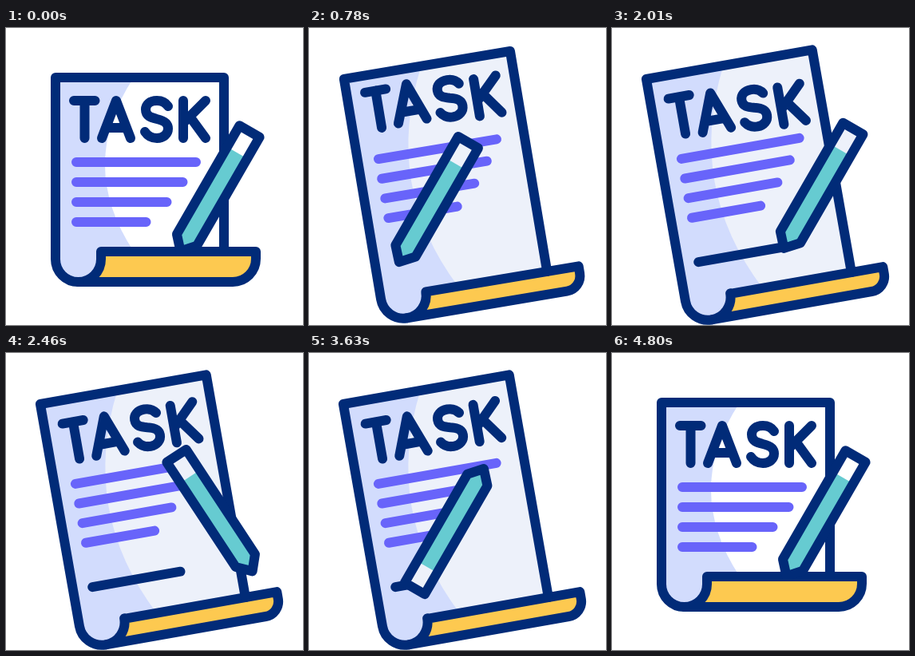
Animation, 372 px wide and 372 px high, one loop 5.13 s. Source, as an HTML page:

```html
<!DOCTYPE html>
<html lang="en">
<head>
<meta charset="utf-8">
<title>Task</title>
<style>
  html, body { margin: 0; width: 100%; height: 100%; overflow: hidden; background: #fff; }
  svg { display: block; width: 100vw; height: 100vh; }
  .ink { stroke: #012b78; stroke-width: 12; }
</style>
</head>
<body>
<svg viewBox="0 0 372 372" fill="none" stroke-linecap="round" stroke-linejoin="round">
  <g id="page">
    <path id="sheet"/>
    <path id="shade" fill="#d2dcfd"/>
    <path id="roll" class="ink" fill="#fdc950"/>
    <path id="outline" class="ink"/>
    <path stroke="#6864fa" stroke-width="12" d="M88 168H238M88 193H221.500M88 218H201.500M88 243H175.500"/>
    <path id="written" class="ink"/>
    <g id="word" class="ink" role="img" aria-label="TASK">
      <path d="M85 91H111.500M98.500 91V138"/>
      <path d="M120 138L138 91L156 138M127 125H149"/>
      <path d="M203 98C199 92 194 91 189 91C180 91 175 96 175 102C175 110 181 112 189 114C198 116 203 119 203 126C203 133 197 138 189 138C183 138 178 136 174 130"/>
      <path d="M222 91V138M250 91L222 119M231 112L250 138"/>
    </g>
  </g>
  <g id="pencil">
    <path fill="#66cbd1" d="M-86 -14.500H71L87 0L71 14.500H-86Z"/>
    <path id="eraser" d="M-86 -14.500H-55V14.500H-86Z"/>
    <path class="ink" d="M-86 -14.500H71L87 0L71 14.500H-86Z"/>
  </g>
</svg>
<script>
const LOOP = 5130, STEP = 30, END = 4800;
const $ = id => document.getElementById(id);
const set = (id, name, value) => $(id).setAttribute(name, value);
const letters = [...$('word').children];

// Eased value at time t through [time, value] keys
function track(t, keys) {
  if (t <= keys[0][0]) return keys[0][1];
  for (let i = 1; i < keys.length; i++) {
    const [t0, a] = keys[i - 1], [t1, b] = keys[i];
    if (t <= t1) {
      const p = (t - t0) / (t1 - t0);
      return a + (b - a) * p * p * (3 - 2 * p);
    }
  }
  return keys[keys.length - 1][1];
}

const OPEN = [[0, 0], [900, 1], [3900, 1], [END, 0]];
const WRITE = [[1200, 0], [2100, 1], [3000, 1], [3900, 0]];
const HOP = [[0, 0], [633, -10], [1367, 10], [2000, 0]];
const PEN_X = [[0, 262], [900, 151], [1200, 151], [2100, 262], [3000, 258.5], [3900, 152.5], [END, 262]];
const PEN_Y = [[0, 204], [900, 218.5], [1200, 218.5], [2100, 200], [3000, 202], [3900, 225.5], [END, 204]];
const PEN_TURN = [[2100, 120], [3000, -60], [3955, -60], [END, 120]];

function drawPage(t) {
  const open = track(t, OPEN);
  const top = 280 + 65 * open;         // upper edge of the roll
  const height = 38 - 10 * open;       // the roll thins as it unwinds
  const bottom = top + height, curl = bottom - 28.5, corner = height - 9;
  const scroll = `H119V${curl}A28.500 28.500 0 0 1 62 ${curl}Z`;

  set('page', 'transform', `rotate(${-10 * open} 64 172)`);
  set('sheet', 'd', `M62 62H273V${top}${scroll}`);
  set('shade', 'd', `M62 62H160Q88 ${(62 + top) / 2} 160 ${top}${scroll}`);
  set('roll', 'd', `M119 ${top}H313V${bottom - corner}a${corner} ${corner} 0 0 1 ${-corner} ${corner}` +
    `H90.500A28.500 28.500 0 0 0 119 ${curl}Z`);
  set('outline', 'd', `M273 ${top}V62H62V${curl}A28.500 28.500 0 0 0 90.500 ${bottom}`);

  const written = track(t, WRITE);
  set('written', 'd', written ? `M86.500 299h${112 * written}` : '');
  letters.forEach((letter, i) =>
    letter.setAttribute('transform', `translate(0 ${track(t - 200 * i, HOP)})`));
}

function frame(now) {
  const t = Math.min(END, Math.floor(now % LOOP / STEP) * STEP);
  const white = t > 540 && t < 4560 ? '#edf1fa' : '#fff';
  drawPage(t);
  set('sheet', 'fill', white);
  set('eraser', 'fill', white);
  set('pencil', 'transform',
    `translate(${track(t, PEN_X)} ${track(t, PEN_Y)}) rotate(${track(t, PEN_TURN)})`);
  requestAnimationFrame(frame);
}
frame(performance.now());
</script>
</body>
</html>
```
